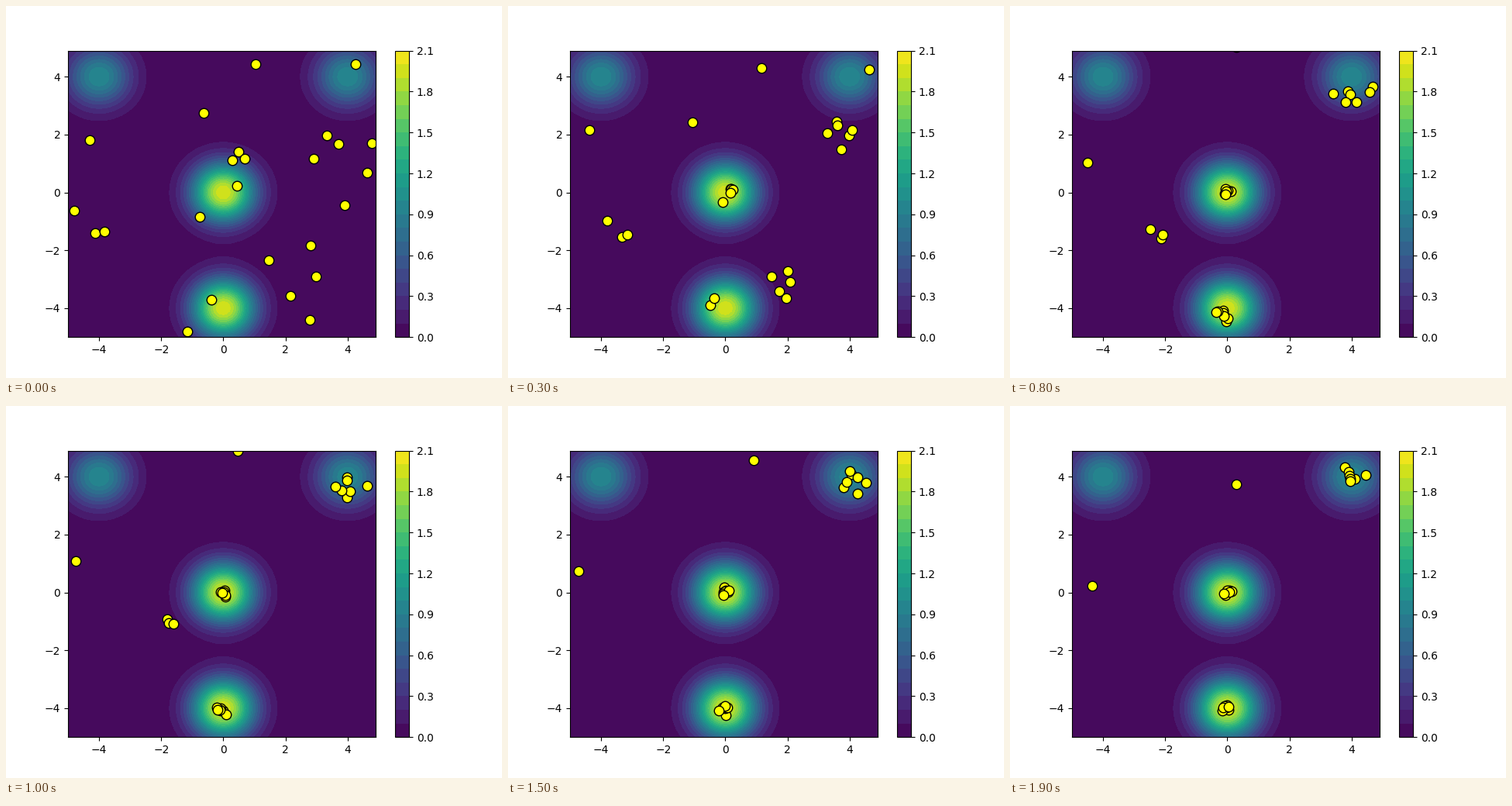
Write a matplotlib script that moves like this. It is 640x480 px and loops after 2 s.

```python
import numpy as np
import matplotlib.pyplot as plt
from matplotlib.animation import FuncAnimation

W, H, DPI = 640, 480, 100
FRAMES, INTERVAL = 20, 100
LO, HI = -5, 4.9
CENTRE, BOTTOM = (280, 240), (280, 390)

t = np.arange(FRAMES)
rng = np.random.default_rng(5)


def swarm(starts, path, tau=3, jitter=0):
    """Positions [frame, firefly, xy] in stage pixels.

    The group's middle follows the key points (time, x, y), the group
    draws together with time constant tau, and jitter fades in.
    """
    starts = np.array(starts, float)
    mid = starts.mean(axis=0)
    keys = np.array([(0, *mid), *path])
    middle = np.column_stack([np.interp(t, keys[:, 0], keys[:, k]) for k in (1, 2)])
    spread = np.exp(-t / tau)[:, None, None] * (starts - mid)
    noise = rng.normal(0, jitter, (FRAMES, len(starts), 2))
    return middle[:, None] + spread + noise * np.minimum(t / 8, 1)[:, None, None]


swarms = [
    # wanderers without neighbours
    swarm([(322, 75)], [(3, 327, 80), (8, 292, 53), (15, 317, 70), (19, 292, 101)]),
    swarm([(108, 173)], [(3, 105, 160), (8, 100, 202), (12, 80, 198), (19, 106, 232)]),
    # upper right peak
    swarm([(451, 75)], [(3, 466, 82), (8, 468, 104), (15, 462, 99), (19, 459, 89)]),
    swarm([(437, 257), (466, 215), (472, 177), (414, 167), (397, 197), (429, 178)],
          [(3, 430, 164), (5, 430, 137), (8, 437, 114), (12, 443, 94)], jitter=9),
    # centre peak
    swarm([(88, 264), (115, 293), (127, 291)],
          [(3, 143, 290), (5, 169, 298), (8, 190, 293), (12, 235, 263), (15, *CENTRE)],
          tau=8, jitter=3),
    swarm([(255, 138)], [(3, 237, 150), (5, 270, 175), (8, *CENTRE)], jitter=3),
    swarm([(250, 272), (300, 188), (292, 199), (308, 197), (298, 232)],
          [(3, 286, 241), (5, 286, 243), (8, *CENTRE)], tau=2, jitter=3),
    # lower peak
    swarm([(339, 328), (367, 374), (393, 309), (392, 405), (400, 349)],
          [(3, 355, 358), (5, 348, 367), (8, 277, 396), (12, *BOTTOM)], jitter=3),
    swarm([(234, 420), (265, 379)],
          [(3, 263, 381), (5, 258, 389), (8, 265, 391), (12, *BOTTOM)],
          tau=2, jitter=3),
]

fig, ax = plt.subplots(figsize=(W / DPI, H / DPI), dpi=DPI)

grid = np.arange(-50, 50) / 10
X, Y = np.meshgrid(grid, grid)
Z = sum(h * np.exp(-(X - a) ** 2 - (Y - b) ** 2)
        for h, a, b in [(2, 0, 0), (2, 0, -4), (1, 4, 4), (1, -4, 4)])
field = ax.contourf(X, Y, Z, levels=np.arange(22) / 10)
fig.colorbar(field, ax=ax, ticks=np.arange(8) * 0.3, format='%.1f')
ax.set(xlim=(LO, HI), ylim=(LO, HI),
       xticks=range(-4, 5, 2), yticks=range(-4, 5, 2))

# Stage pixels to data units
box = ax.get_position()
spots = np.round(np.concatenate(swarms, axis=1))
xs = LO + (spots[..., 0] - box.x0 * W) / (box.width * W) * (HI - LO)
ys = LO + (H - spots[..., 1] - box.y0 * H) / (box.height * H) * (HI - LO)

flies, = ax.plot([], [], 'o', ms=9, mfc='yellow', mec='black', mew=1)


def draw(i):
    flies.set_data(xs[i], ys[i])
    return flies,


anim = FuncAnimation(fig, draw, frames=FRAMES, interval=INTERVAL,
                     init_func=lambda: draw(0), repeat=True)
plt.show()
```
